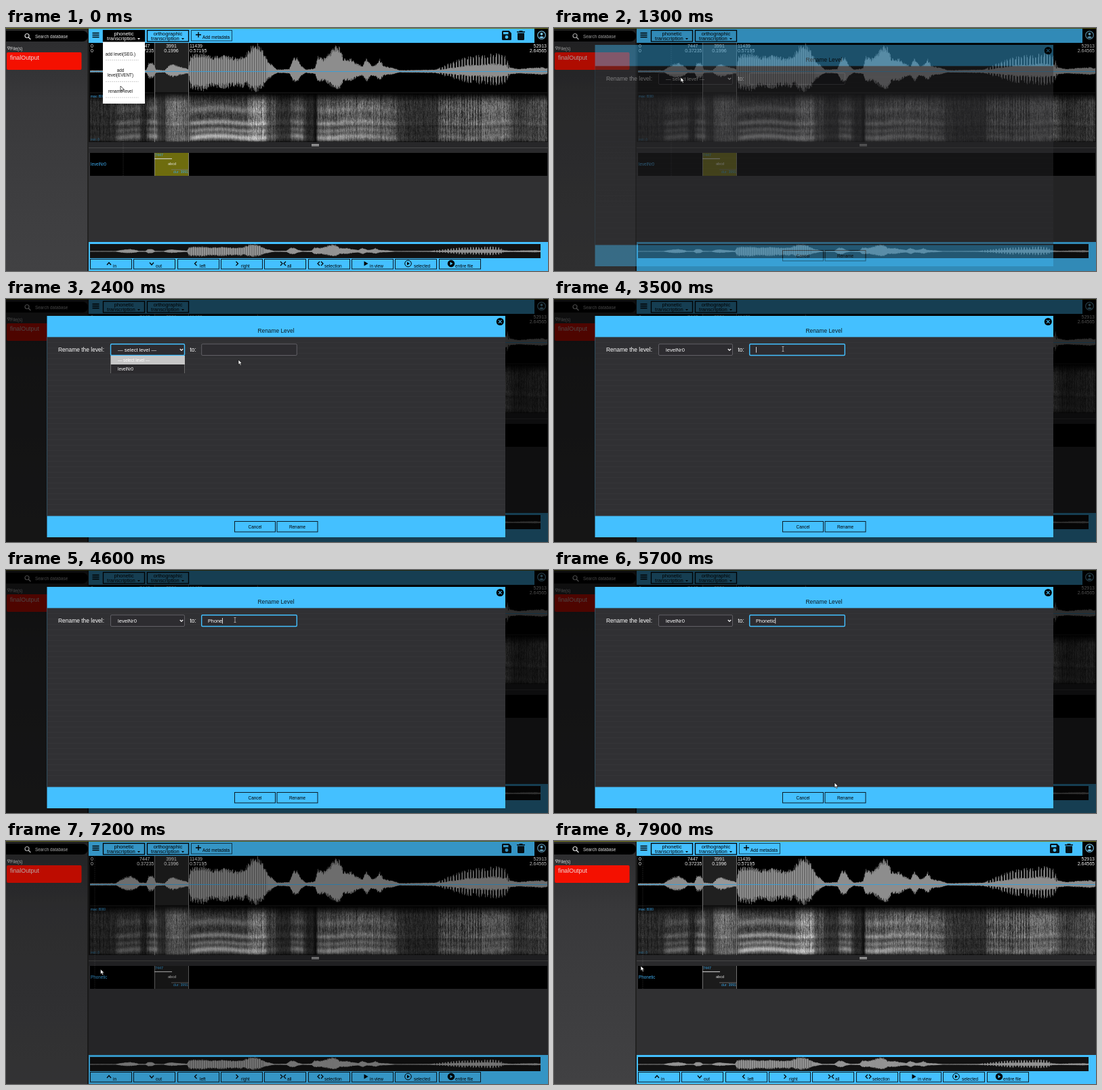
An HTML page with a canvas that plays this animation: 800x360 px, repeating every 8 s.

```html
<!DOCTYPE html>
<html lang="en">
<head>
<meta charset="utf-8">
<title>Rename level</title>
<style>
  html, body { margin: 0; width: 100%; height: 100%; overflow: hidden; background: #303032; }
  canvas, svg { position: absolute; left: 0; top: 0; width: 800px; height: 360px; }
  text { font-family: "Liberation Sans", Arial, sans-serif; white-space: pre; }
</style>
</head>
<body>
<canvas id="view" width="800" height="360"></canvas>
<svg id="ui" viewBox="0 0 800 360"></svg>
<script>
const LOOP = 8000, BLUE = '#44c0ff', LINK = '#3aa5e6';
const $ = id => document.getElementById(id);
const clamp = v => Math.max(0, Math.min(1, v));
const ramp = (t, a, b) => clamp((t - a) / (b - a));

function seeded(s) {
  return () => {
    s = (s * 1664525 + 1013904223) >>> 0;
    return s / 4294967296;
  };
}

// ---------- signal canvas ----------
// x, height above the axis
const ENVELOPE = [
  124, 2, 162, 2, 168, 7, 176, 12, 184, 13, 192, 9, 197, 3, 207, 3, 211, 15, 217, 13,
  221, 3, 234, 2, 240, 9, 247, 12, 255, 8, 269, 4, 272, 25, 290, 29, 302, 23, 322, 25,
  342, 21, 354, 27, 362, 39, 371, 42, 379, 33, 386, 17, 395, 8, 400, 3, 418, 4, 424, 21,
  430, 22, 435, 10, 442, 3, 456, 5, 460, 24, 468, 20, 477, 28, 485, 40, 492, 38, 498, 20,
  509, 20, 518, 12, 526, 9, 532, 21, 539, 9, 545, 10, 551, 20, 557, 9, 574, 5, 580, 2,
  634, 3, 646, 9, 662, 15, 682, 23, 702, 25, 722, 28, 738, 23, 743, 7, 755, 4, 790, 7, 800, 5
];

function height(x) {
  let i = 2;
  while (i < ENVELOPE.length - 2 && ENVELOPE[i] < x) i += 2;
  const [x0, h0, x1, h1] = ENVELOPE.slice(i - 2, i + 2);
  return h0 + (h1 - h0) * clamp((x - x0) / (x1 - x0));
}

function drawWave(c, left, width, mid, scale) {
  const rnd = seeded(7);
  for (let x = 124; x < 799; x += 0.5) {
    const pulsed = x > 638 && x < 742, voiced = x > 270 && x < 386;
    let h = height(x);
    if (pulsed) h *= x % 4.2 < 1.6 ? 1.05 : 0.45;
    const up = h * (0.72 + 0.28 * rnd());
    const down = h * (voiced ? (x < 352 ? 1.05 : 0.75) : 0.74) * (0.65 + 0.35 * rnd());
    const bright = voiced ? 0.62 + 0.22 * Math.sin(x * 1.9) : 0.72;
    c.fillStyle = `rgba(205,205,205,${bright})`;
    c.fillRect(left + (x - 124) * width / 675, mid - up * scale, 0.65, (up + down) * scale);
  }
}

// end x, overall grey, formant strength
const SOUNDS = [
  160, 42, 10, 196, 52, 60, 206, 40, 8, 221, 62, 80, 234, 36, 12, 260, 100, 20, 270, 82, 25,
  355, 66, 125, 382, 120, 85, 397, 72, 30, 418, 40, 25, 437, 66, 80, 452, 38, 12, 457, 15, 0,
  495, 80, 90, 540, 92, 65, 574, 84, 50, 590, 54, 12, 636, 48, 8, 742, 96, 35, 770, 58, 20, 800, 78, 12
];
const FORMANTS = [[64, 4.5, 1], [54, 3.5, 0.6], [43, 4, 0.65], [23, 5, 0.4]];

function drawSpectrogram(c) {
  const img = c.createImageData(675, 72), rnd = seeded(31);
  let level = 42, voice = 10;
  for (let x = 0; x < 675; x++) {
    let i = 0;
    while (SOUNDS[i] < x + 124) i += 3;
    level += (SOUNDS[i + 1] - level) * 0.3;
    voice += (SOUNDS[i + 2] - voice) * 0.3;
    const stripe = x > 512 && x < 580 && x % 4 < 1.5 ? 0.65 : 1;
    const column = (0.75 + 0.4 * rnd()) * stripe;
    let grain = 0;
    for (let y = 0; y < 72; y++) {
      grain = grain * 0.6 + (rnd() - 0.5) * 0.45;
      let v = level * (column + grain) * (y > 46 ? 0.82 : 1);
      for (const [mid, w, k] of FORMANTS) {
        const d = (y - mid - 1.5 * Math.sin(x / 17)) / w;
        v += voice * k * Math.exp(-d * d);
      }
      v *= clamp((y + 1) / 13) * clamp((73 - y) / 4);
      img.data.set([v, v, v, 255], (y * 675 + x) * 4);
    }
  }
  c.putImageData(img, 124, 97);
}

function drawView() {
  const c = $('view').getContext('2d');
  const box = (x, y, w, h, f) => { c.fillStyle = f; c.fillRect(x, y, w, h); };
  const side = c.createLinearGradient(0, 0, 0, 360);
  side.addColorStop(0, '#2b2b2d');
  side.addColorStop(0.3, '#39393b');
  side.addColorStop(1, '#414143');
  box(0, 0, 800, 360, '#303032');
  box(0, 0, 122, 360, side);
  box(120, 0, 2, 360, '#222');
  box(122, 22, 678, 155, '#101010');
  box(124, 22, 675, 73, '#000');
  box(219, 22, 51, 73, '#202020');
  drawWave(c, 124, 675, 64.5, 1);
  box(124, 64, 675, 1, 'rgba(48,160,222,.85)');
  drawSpectrogram(c);
  box(219, 97, 51, 72, 'rgba(255,255,255,.06)');
  box(122, 169, 678, 8, '#272729');
  box(122, 177, 678, 1, '#484848');
  box(122, 178, 678, 7, '#2a2a2c');
  box(451, 172, 11, 1, '#ddd');
  box(451, 174, 11, 1, '#ddd');
  box(124, 185, 675, 34, '#000');
  box(122, 317, 678, 43, BLUE);
  box(124, 320, 665, 21, '#121212');
  drawWave(c, 124, 665, 331, 0.27);
}

// ---------- interface ----------
const rect = (x, y, w, h, fill, more = '') =>
  `<rect x="${x}" y="${y}" width="${w}" height="${h}" fill="${fill}" ${more}/>`;
const text = (x, y, s, size, fill, anchor = 'start', more = '') =>
  `<text x="${x}" y="${y}" font-size="${size}" fill="${fill}" text-anchor="${anchor}" ${more}>${s}</text>`;
const path = (d, stroke = '#000', w = 1.2, fill = 'none', more = '') =>
  `<path d="${d}" stroke="${stroke}" stroke-width="${w}" fill="${fill}" ${more}/>`;
const group = (id, s) => `<g id="${id}">${s}</g>`;
const frame = (x, y, w, h, id = '') =>
  rect(x + .5, y + .5, w - 1, h - 1, 'none', `stroke="#0b1c26" ${id && `id="${id}"`}`);

function menuButton(x, word) {
  return rect(x + .5, 3.5, 61, 16.5, 'none', 'stroke="#000" stroke-width="1.3"') +
    text(x + 31, 10.8, word, 7.7, '#000', 'middle') +
    text(x + 6, 18, 'transcription', 7.7, '#000') +
    path(`M${x + 51} 15h4l-2 2.2z`, 'none', 0, '#000');
}

function sidebar() {
  return rect(0, 0, 800, 1, '#73751c') +
    rect(-8, 4, 129, 16, '#000', 'rx="8"') +
    `<circle cx="31" cy="11.5" r="3" fill="none" stroke="#ddd" stroke-width="1.2"/>` +
    path('M33.2 13.7l3.2 3.2', '#ddd', 1.4) +
    text(43, 14.6, 'Search database', 6.4, '#ddd') +
    path('M2 28h4l-2 4z', '#ddd', .7) + text(6.3, 32.8, 'File(s)', 6.5, '#ddd') +
    rect(1, 36, 110.5, 26, '#f41000', 'rx="2"') +
    text(6, 47, 'finalOutput', 8.9, '#f0dcdc');
}

function topBar() {
  const tools = rect(273.5, 3.5, 60, 15.5, 'none', 'stroke="#12455f"') +
    path('M280 10h8M284 6v8', '#000', 1.3) + text(290, 16.4, 'Add metadata', 6.45, '#000') +
    path('M732 5.5q0-1.5 1.5-1.5h9l3.500 3.500v9q0 1.500-1.500 1.500h-11q-1.500 0-1.500-1.500z', 'none', 0, '#06131a') +
    rect(734, 6, 7.5, 3.2, BLUE) + `<circle cx="739" cy="13.500" r="2.400" fill="${BLUE}"/>` +
    path('M754 5h3l1-1h4l1 1h3v1.500h-12zM755 7.500h10v9q0 1.500-1.500 1.500h-7q-1.500 0-1.500-1.500z', 'none', 0, '#06131a');
  return rect(122, 1, 678, 21, BLUE) +
    path('M127.500 7.500h10M127.500 10.500h10M127.500 13.500h10', '#000', 1.3) +
    menuButton(143, 'phonetic') + menuButton(208, 'orthographic') + group('tools', tools) +
    rect(780, 1, 20, 21, '#000') +
    `<circle cx="790.500" cy="10.500" r="5.800" fill="none" stroke="#7fd0f8" stroke-width="1.100"/>` +
    `<circle cx="790.500" cy="8.800" r="1.900" fill="#7fd0f8"/>` +
    path('M787 13.800q3.500-3.200 7 0q-3.500 2.400-7 0z', 'none', 0, '#7fd0f8');
}

function signalLabels() {
  const pair = (x, a, b, anchor) =>
    text(x, 29.3, a, 7, '#eee', anchor) + text(x, 36, b, 7, '#eee', anchor);
  return pair(125, '0', '0') + pair(218.5, '', '0.37235', 'end') + text(212.500, 29.3, '7447', 7, '#eee', 'end') +
    pair(244, '3991', '0.1996', 'middle') + pair(271, '11439', '0.57195') + pair(798, '52913', '2.64565', 'end') +
    path('M219.500 22V169M269.500 22V169', '#888', .8) +
    text(125, 103, 'max: 8000', 4.7, LINK) + text(125, 167, 'min: 0', 4.7, '#25688f');
}

function levelRow() {
  return rect(219, 185, 51, 34, '#1b1b1b', 'id="segment"') +
    path('M219.500 185V219M269.500 185V219', '#888', .8) +
    text(125, 204, '', 6.3, LINK, 'start', 'id="levelName"') +
    text(220, 190, '7447', 5.4, LINK) + rect(219, 193.2, 26, 1, '#ddd') +
    text(245, 203, 'abcd', 5.5, '#eee', 'middle') +
    rect(244, 209.500, 26, .8, '#777') + text(269, 215, 'dur: 3991', 5.2, LINK, 'end');
}

function bottomBar() {
  const up = x => `M${x - 3} 351l3-3.500 3 3.500`, down = x => `M${x - 3} 347.500l3 3.500 3-3.500`;
  const lt = x => `M${x + 1.5} 346l-3 3 3 3`, gt = x => `M${x - 1.5} 346l3 3-3 3`;
  const play = x => path(`M${x - 2.500} 345.500l6 3.500-6 3.500z`, 'none', 0, '#000');
  const ring = (x, fill, ink) => `<circle cx="${x}" cy="349" r="4.800" fill="${fill}" stroke="#000"/>` +
    path(`M${x - 1.500} 346.500l4 2.500-4 2.500z`, 'none', 0, ink);
  const items = [
    ['in', 158, path(up(152))], ['out', 221, path(down(215))],
    ['left', 286, path(lt(280))], ['right', 347, path(gt(341))],
    ['all', 415, path(gt(406.500) + lt(411.500))], ['selection', 470, path(lt(461.500) + gt(466.500))],
    ['in view', 537, play(531)], ['selected', 602, ring(593.500, 'none', '#000')],
    ['entire file', 663, ring(657, '#000', BLUE)]
  ];
  return items.map(([name, x, icon], i) =>
    frame(Math.round(124 + i * 64.35), 342, 62, 15.500) + icon + text(x, 355, name, 6.5, '#000')).join('');
}

function menu() {
  const item = (y, s) => text(169, y, s, 6.3, '#111', 'middle');
  const dash = y => path(`M147 ${y}H196`, '#bbb', .7, 'none', 'stroke-dasharray="2 1"');
  return rect(143, 3, 62, 18, '#000') + text(174, 10.800, 'phonetic', 7.7, '#fff', 'middle') +
    text(149, 18, 'transcription', 7.7, '#fff') + path('M194 15h4l-2 2.200z', 'none', 0, '#fff') +
    rect(143, 20.500, 62, 91.500, '#fff') +
    item(40.500, 'add level(SEG.)') + dash(47.500) + item(65, 'add') + item(72, 'level(EVENT)') + dash(79.500) +
    item(96.300, 'rename level') + dash(103);
}

function dialog() {
  const field = (x, w, id) =>
    rect(x, 66.700, w, 16.800, '#2d2c30', `rx="1.500" id="${id}"`);
  const options = rect(154, 84, 110, 26, '#2b2a2d') + rect(154, 84, 110, 13, '#c6c6c6') +
    path('M154.500 84v26M263.500 97v13', '#777', .8) +
    text(165, 93, '— select level —', 6.3, '#fff') + text(165, 105.800, 'levelNr0', 6.3, '#fff');
  return rect(60.500, 25, 676.500, 328, BLUE) + rect(60.500, 56.500, 676.500, 265, '#303033') +
    rect(60.500, 56.500, 676.500, 265, 'url(#lines)') +
    text(398.500, 50, 'Rename Level', 8.4, '#0a1a22', 'middle') +
    `<circle cx="729.300" cy="33.500" r="5.500" fill="#000"/>` + path('M727 31.200l4.600 4.600m0-4.600l-4.600 4.600', BLUE, 1.1) +
    text(77, 78, 'Rename the level:', 8.45, '#fff') + text(271.500, 78, 'to:', 8.45, '#fff') +
    field(154.500, 109, 'select') + text(165, 78, '', 7.6, '#fff', 'start', 'id="choice"') +
    path('M256.800 74l2.200 2.200 2.200-2.200', '#fff', 1.2) +
    field(288.700, 140.600, 'input') + text(298, 78, '', 7.3, '#fff', 'start', 'id="typed"') +
    rect(298, 71, .8, 8.500, '#fff', 'id="caret"') +
    group('options', options) +
    frame(337, 329, 61, 16.500) + frame(399.500, 329, 61, 16.500) +
    text(367.500, 339.600, 'Cancel', 6.4, '#000', 'middle') + text(430, 339.600, 'Rename', 6.4, '#000', 'middle');
}

$('ui').innerHTML =
  `<defs><pattern id="lines" width="8" height="8" patternUnits="userSpaceOnUse">${rect(0, 0, 8, 1, '#3a393d', 'opacity=".5"')}</pattern></defs>` +
  sidebar() + topBar() + signalLabels() + levelRow() + group('zoom', bottomBar()) +
  path('M.5 22V219', '#aaa', .7, 'none', 'id="cross" opacity=".25" stroke-dasharray="2 1"') +
  group('menu', menu()) + rect(0, 0, 800, 360, '#000', 'id="shade"') + group('dialog', dialog()) +
  group('arrow', path('M0 0v7.200l1.700-1.500 1.200 2.700 1.400-.6-1.200-2.600h2.300z', '#111', .7, '#fff')) +
  group('beam', path('M-1.500-3.500h3M0-3.500v7M-1.500 3.500h3', '#bbb', .8));

// ---------- motion ----------
// time, x, y of the pointer
const ROUTE = [
  [0, 169, 86], [100, 169, 86], [600, 171, 93], [800, 171, 93], [1300, 187, 73], [1700, 198, 75],
  [1900, 198, 76], [2100, 195, 103], [2400, 343, 90], [2700, 338, 74], [5000, 338, 74],
  [5700, 414, 315], [6000, 429, 337], [6500, 429, 337], [7000, 151, 195], [7400, 128, 185], [8000, 128, 185]
];

function pointer(t) {
  const i = ROUTE.findIndex(p => p[0] > t);
  const [t0, x0, y0] = ROUTE[i - 1], [t1, x1, y1] = ROUTE[i];
  const k = (t - t0) / (t1 - t0);
  return [x0 + (x1 - x0) * k, y0 + (y1 - y0) * k];
}

const show = (id, on) => $(id).setAttribute('visibility', on ? 'inherit' : 'hidden');
const border = (id, on) => {
  $(id).setAttribute('stroke', on ? BLUE : '#67666b');
  $(id).setAttribute('stroke-width', on ? 1.4 : .9);
};
const within = (t, a, b) => t >= a && t < b;

function letters(t) {
  if (t < 4200) return 0;
  if (t < 4900) return Math.min(6, (t - 4100) / 100);
  return t < 5000 ? 7 : 8;
}

function draw(time) {
  const t = Math.floor((time % LOOP) / 100) * 100;
  const fadeIn = ramp(t, 1050, 1650);
  const renamed = t >= 6500;
  const modal = within(t, 1000, 6800);

  show('menu', t < 900);
  show('tools', !modal);
  show('zoom', !modal);
  $('segment').setAttribute('fill', renamed ? '#1b1b1b' : '#6e6c0e');
  $('levelName').textContent = renamed ? 'Phonetic' : 'levelNr0';
  $('cross').setAttribute('transform', `translate(${t < 6800 ? 172.5 : 130.5} 0)`);

  $('shade').setAttribute('opacity', 0.68 * fadeIn * (1 - ramp(t, 6800, 7400)));
  $('dialog').setAttribute('opacity', fadeIn * (1 - ramp(t, 6500, 6800)));
  $('choice').textContent = t < 2500 ? '— select level —' : 'levelNr0';
  show('options', within(t, 1800, 2500));
  border('select', within(t, 1700, 2700));
  border('input', t >= 2700);

  $('typed').textContent = 'Phonetic'.slice(0, letters(t));
  const width = letters(t) ? $('typed').getComputedTextLength() : 0;
  $('caret').setAttribute('x', 298 + width);
  show('caret', within(t, 2700, 3200) || within(t, 3500, 4000) || within(t, 4200, 5200) || within(t, 5600, 6200));

  const [x, y] = pointer(t), typing = within(t, 2700, 5100);
  show('beam', typing);
  show('arrow', !typing);
  for (const id of ['beam', 'arrow']) $(id).setAttribute('transform', `translate(${x} ${y})`);
}

drawView();
const start = performance.now();
function tick() {
  draw(performance.now() - start);
  requestAnimationFrame(tick);
}
tick();
</script>
</body>
</html>
```
